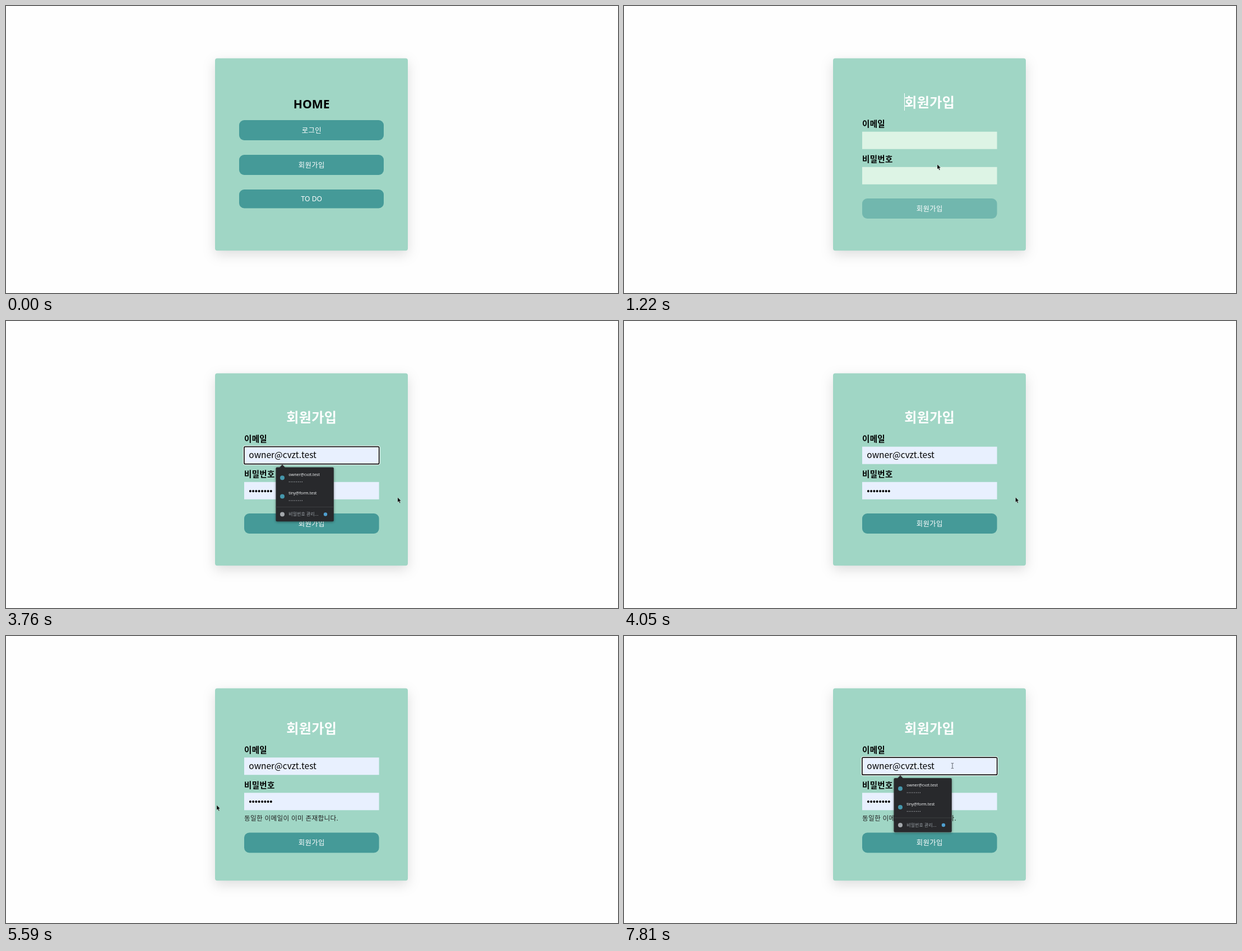
Recreate the animation shown at these times as an HTML page. Size 1092 px wide and 513 px high, loop 8000 ms.

```html
<!DOCTYPE html>
<html lang="ko">
<head>
<meta charset="utf-8">
<title>회원가입</title>
<style>
html, body { margin: 0; width: 100%; height: 100%; overflow: hidden; background: #fefefe; }
svg { display: block; width: 100%; height: 100%; }
text { font-family: "Noto Sans CJK KR", "Noto Sans CJK", "Noto Sans", sans-serif; }
.card { fill: #a0d6c5; filter: drop-shadow(0 7px 11px rgba(0, 0, 0, .13)); }
.btn rect { fill: #459a98; }
.btn text { fill: #fff; font-size: 12.4px; letter-spacing: .35px; text-anchor: middle; }
.btn .latin { font: 12.1px "Noto Sans", sans-serif; letter-spacing: 0; }
.home { font: bold 21.2px "Noto Sans", sans-serif; text-anchor: middle; }
.title { font-size: 24.1px; font-weight: bold; letter-spacing: .35px; fill: #fff; }
.label { font-size: 14.5px; font-weight: bold; letter-spacing: .3px; }
.value { font: 15.5px "Liberation Sans", Arial, sans-serif; }
.note { font-size: 11.7px; letter-spacing: .24px; fill: #222; }
.field { fill: #ddf4e5; }
.filled .field { fill: #e8f0fe; }
.ring { fill: none; }
.pop { filter: drop-shadow(0 1px 2px rgba(0, 0, 0, .4)); }
.pop .mail { font: 7.2px "Noto Sans", sans-serif; fill: #f1f3f4; }
.pop .foot { font-size: 8px; fill: #9aa0a6; }
.dots { fill: none; stroke: #aeb2b7; stroke-width: 1.5; stroke-dasharray: 0 3.25; stroke-linecap: round; }
</style>
</head>
<body>
<svg viewBox="0 0 1092 513" preserveAspectRatio="none">
  <rect class="card" x="373" y="93.5" width="344" height="343.7" rx="4"/>

  <g id="home">
    <text class="home" x="545.2" y="182.5">HOME</text>
    <g class="btn">
      <rect x="416" y="204" width="258" height="36" rx="9"/>
      <text x="545.3" y="227">로그인</text>
      <rect x="416" y="266" width="258" height="36" rx="9"/>
      <text x="545.3" y="289">회원가입</text>
      <rect x="416" y="328" width="258" height="33.5" rx="9"/>
      <text class="latin" x="545.3" y="348.8">TO DO</text>
    </g>
  </g>

  <g id="join">
    <g id="head">
      <text class="title" x="500.3" y="181">회원가입</text>
      <rect id="titleCaret" x="500" y="156" width="1" height="31" fill="#fff"/>
      <text class="label" x="425" y="216">이메일</text>
      <rect class="field" x="425" y="224.7" width="240.6" height="31"/>
      <text class="label" x="425" y="279">비밀번호</text>
      <rect class="field" x="425" y="287.8" width="240.6" height="31"/>
      <g id="values" class="value">
        <text x="433.3" y="245.3">owner@cvzt.test</text>
        <text x="433.3" y="308.5">••••••••</text>
      </g>
      <g id="focus">
        <rect class="ring" x="424.6" y="224.4" width="241.4" height="31.6" rx="2.5" stroke="#fff" stroke-width="3.2"/>
        <rect class="ring" x="424.9" y="224.7" width="240.8" height="31" rx="2" stroke="#101010" stroke-width="1.7"/>
        <rect id="mailCaret" x="547" y="231.5" width="1" height="18"/>
      </g>
    </g>
    <text id="note" class="note" x="425" y="330">동일한 이메일이 이미 존재합니다.</text>
    <g id="submit" class="btn">
      <rect id="submitBox" x="425" y="344" width="240.6" height="36" rx="9"/>
      <text x="545.3" y="366.7">회원가입</text>
    </g>
    <g id="pop" class="pop">
      <path d="M488 262L493 256.5L498 262Z" fill="#28292c"/>
      <rect x="481.5" y="261.4" width="103.3" height="96.8" rx="2" fill="#28292c"/>
      <circle cx="493" cy="280.3" r="4" fill="#4597ac"/>
      <text class="mail" x="504.3" y="276.6">owner@cvzt.test</text>
      <path class="dots" d="M505.5 287.6h23"/>
      <circle cx="493" cy="313.6" r="4" fill="#4597ac"/>
      <text class="mail" x="504.3" y="310">tiny@form.test</text>
      <path class="dots" d="M505.5 320.9h23"/>
      <path d="M481.5 332.5h103.3" stroke="#3f4145" stroke-width=".9"/>
      <circle cx="493" cy="345.5" r="4" fill="#a4a8ac"/>
      <text class="foot" x="504.3" y="348.3">비밀번호 관리...</text>
      <circle cx="570" cy="345.5" r="3.2" fill="#4f9fd0"/>
    </g>
  </g>

  <g id="cursor">
    <path id="arrow" d="M0 0V8.8L2 7.1L3.5 10.4L5 9.8L3.5 6.5H6.2Z" stroke="#fff" stroke-width=".4"/>
    <path id="hand" d="M-1 1Q0-1 1 1V5Q2 4 3 5.2Q4 4.4 4.8 5.8Q6 5.2 6 7V9Q6 11 5 13H0Q-1-.4 -1 10L-3.2 7.4Q-3.6 6-2 6.4L-1 7.4Z" fill="#fff" stroke="#111" stroke-width=".9"/>
    <path id="beam" d="M-2.2-4.6H-.6L0-4L.6-4.6H2.2M0-4V4M-2.2 4.6H-.6L0 4L.6 4.6H2.2" fill="none" stroke="#4a4f58" stroke-width=".9"/>
  </g>
</svg>
<script>
const LOOP = 8000, STEP = 66;
const $ = id => document.getElementById(id);
const show = (id, on) => { $(id).style.display = on ? '' : 'none'; };
const shift = (id, y) => $(id).setAttribute('transform', `translate(0 ${y})`);

// time, x, y, pointer shape from here on
const path = [
  [130, 974, 430, 'arrow'], [400, 750, 325, 'arrow'], [620, 592, 252, 'arrow'],
  [720, 566, 243, 'arrow'], [800, 562, 268, 'hand'], [890, 559, 283, 'hand'],
  [1020, 559, 283, 'arrow'], [1760, 559, 283, 'arrow'], [1940, 540, 249, 'beam'],
  [2180, 540, 249, 'beam'], [2320, 442, 253, 'beam'], [2480, 440, 249, 'beam'],
  [2800, 571, 246, 'beam'], [3400, 571, 246, 'beam'], [3560, 660, 290, 'arrow'],
  [3700, 700, 316, 'arrow'], [4020, 700, 316, 'arrow'], [4170, 663, 293, 'beam'],
  [4260, 640, 318, 'arrow'], [4380, 585, 352, 'hand'], [4510, 568, 367, 'hand'],
  [4960, 568, 367, 'hand'], [5060, 555, 348, 'arrow'], [5200, 525, 335, 'arrow'],
  [5400, 440, 315, 'arrow'], [5540, 375, 302, 'arrow'], [5770, 430, 322, 'beam'],
  [5900, 460, 327, 'beam'], [6140, 574, 330, 'beam'], [6250, 535, 342, 'arrow'],
  [6420, 427, 342, 'arrow'], [6640, 427, 342, 'arrow'], [6780, 460, 312, 'arrow'],
  [6850, 490, 295, 'beam'], [6960, 545, 258, 'arrow'], [7080, 586, 232, 'beam'],
  [LOOP, 586, 232, 'beam']
];

function drawCursor(time) {
  const t = Math.floor(time / STEP) * STEP;
  show('cursor', time >= 130);
  const n = Math.max(1, path.findIndex(p => p[0] > t));
  const [a, b] = [path[n - 1], path[n]];
  const k = Math.max(0, (t - a[0]) / (b[0] - a[0]));
  const at = i => a[i] + (b[i] - a[i]) * k;
  $('cursor').setAttribute('transform', `translate(${at(1)} ${at(2)})`);
  for (const shape of ['arrow', 'hand', 'beam']) show(shape, shape === a[3]);
}

function draw(t) {
  const within = (from, to) => t >= from && t < to;
  const blink = from => Math.floor((t - from) / 500) % 2 === 0;
  const filled = t >= 1480, failed = t >= 4720;
  const first = within(3020, 3900), second = t >= 7310;

  show('home', t < 1020);
  show('join', t >= 1020);
  show('titleCaret', within(1220, 1740) || within(2240, 2740));
  show('values', filled);
  $('head').setAttribute('class', filled ? 'filled' : '');
  $('submitBox').style.opacity = filled ? 1 : .5;

  show('focus', first || second);
  show('mailCaret', blink(second ? 7310 : 3090));
  show('pop', within(3090, 3900) || second);
  show('note', failed);

  const rise = failed ? 7.5 : 0;
  shift('head', -rise);
  shift('pop', -rise);
  shift('submit', rise);
  drawCursor(t);
}

const start = performance.now();
function tick() {
  draw((performance.now() - start) % LOOP);
  requestAnimationFrame(tick);
}
tick();
</script>
</body>
</html>
```
